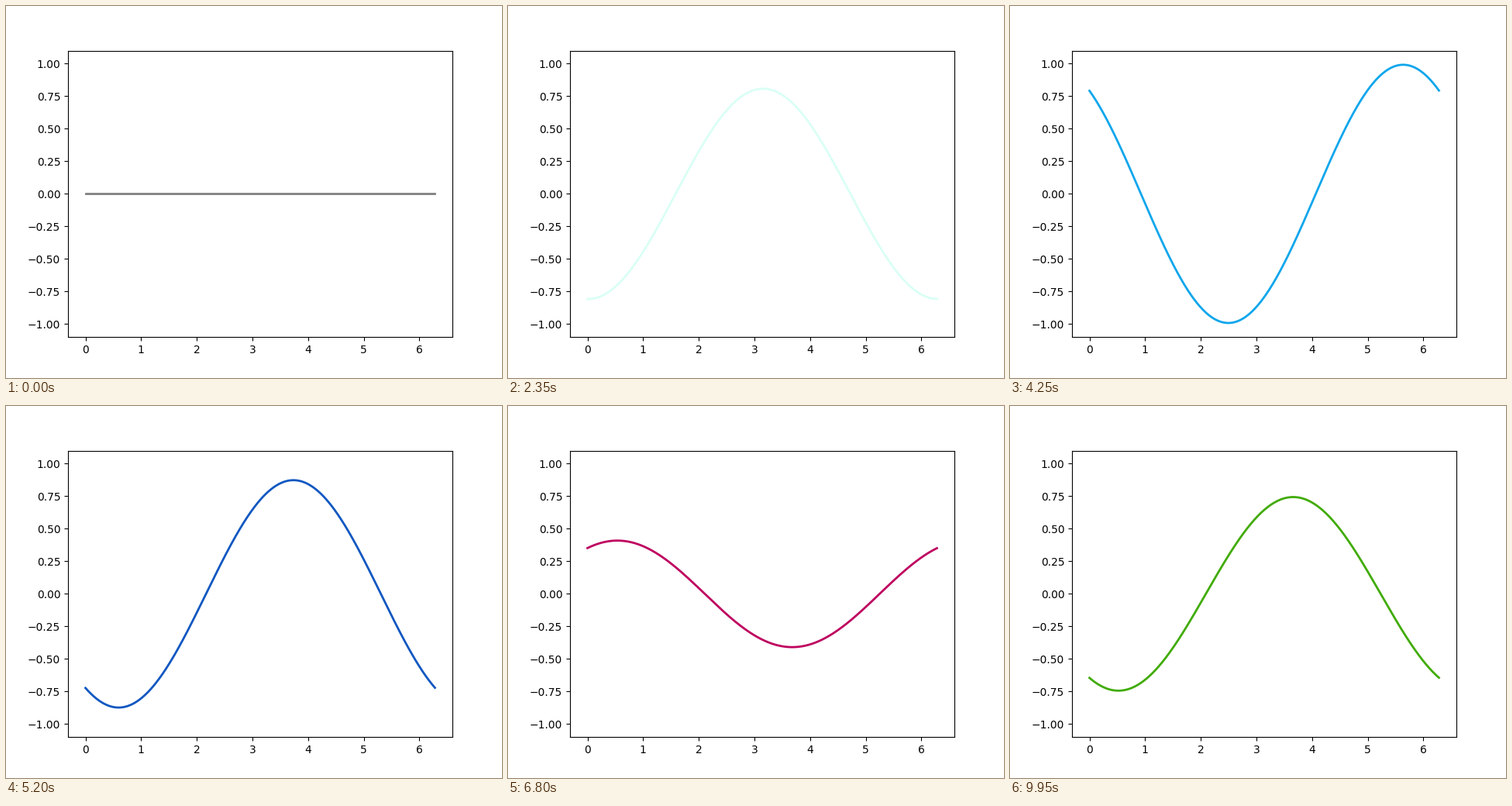
A matplotlib script that plays this animation: 640x480 px, repeating every 10000 ms.

```python
import numpy as np
import matplotlib.pyplot as plt
from matplotlib.animation import FuncAnimation

FRAMES = 200
INTERVAL = 50  # ms

fig, ax = plt.subplots(figsize=(6.4, 4.8), dpi=100)
x = np.arange(0, 2 * np.pi, 0.01)
line, = ax.plot(x, np.sin(x), lw=2)


def pulse(i, period):
    """Colour channel swinging between 0 and 1."""
    return 0.5 + 0.5 * np.sin(i / period)


def update(i):
    # travelling wave under a slow amplitude envelope
    line.set_ydata(np.sin(i / 50) * np.sin(x + i / 10))
    line.set_color((pulse(i, 20), pulse(i, 30), pulse(i, 40)))
    return line,


# fix the limits chosen from the full-height wave
ax.set_xlim(ax.get_xlim())
ax.set_ylim(ax.get_ylim())

anim = FuncAnimation(fig, update, frames=FRAMES, interval=INTERVAL,
                     init_func=lambda: update(0), repeat=True, repeat_delay=0)
plt.show()
```
